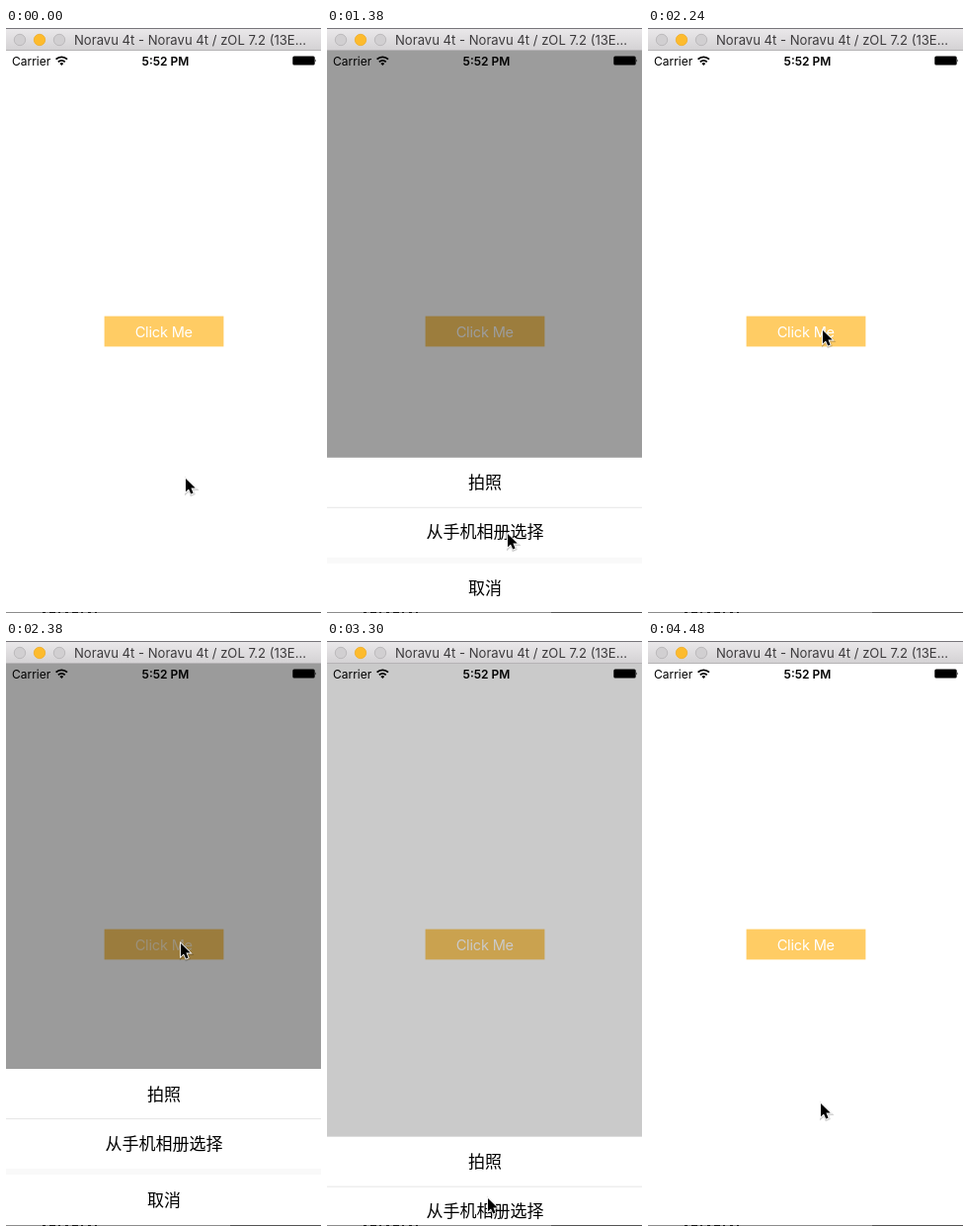
An HTML page that plays this animation: 319x592 px, repeating every 4500 ms.

```html
<!DOCTYPE html>
<html lang="en">
<head>
<meta charset="utf-8">
<title>Action sheet</title>
<style>
html, body { margin: 0; width: 100%; height: 100%; overflow: hidden; background: #fff; }
svg { display: block; width: 100vw; height: 100vh; }
text { font-family: Inter, "Open Sans", sans-serif; }
.mid { text-anchor: middle; }
.row { font-family: "Noto Sans CJK SC", "Noto Sans CJK", sans-serif; font-size: 17px; fill: #000; }
</style>
</head>
<body>
<svg viewBox="0 0 319 592">
  <defs>
    <linearGradient id="bar" x2="0" y2="1">
      <stop offset="0" stop-color="#ebe9eb"/>
      <stop offset="1" stop-color="#d3d1d3"/>
    </linearGradient>
    <clipPath id="screen"><rect y="23" width="319" height="568"/></clipPath>
  </defs>
  <rect width="319" height="592" fill="#fff"/>

  <rect x="99.6" y="291.6" width="120.8" height="30.8" fill="#ffcc64"/>
  <text id="label" class="mid" x="159.8" y="312.5" font-size="14.6" letter-spacing="-.2" fill="#fff">Click Me</text>
  <rect id="dim" y="23" width="319" height="568" opacity="0"/>

  <g clip-path="url(#screen)">
    <g id="sheet">
      <rect width="319" height="160" fill="#fff"/>
      <rect y="50" width="319" height="1" fill="#e6e6e6"/>
      <rect y="101" width="319" height="6" fill="#f9f9f9"/>
      <text class="row mid" x="160" y="31.5">拍照</text>
      <text class="row mid" x="160" y="81.5">从手机相册选择</text>
      <text class="row mid" x="160" y="138.5">取消</text>
    </g>
  </g>

  <text x="6" y="37.5" font-size="12">Carrier</text>
  <g fill="none" stroke="#000" stroke-width="1.8">
    <path d="M50.6 31.7a8 8 0 0 1 11.4 0M52.9 34.3a4.8 4.8 0 0 1 6.8 0"/>
  </g>
  <path d="M56.3 38l-1.9-2.1a2.8 2.8 0 0 1 3.8 0z"/>
  <text class="mid" x="161.5" y="37.5" font-size="12" font-weight="600">5:52 PM</text>
  <rect x="290.3" y="28.4" width="22.4" height="9.2" rx="1.5"/>
  <path d="M313.4 31.4q1.4 1.6 0 3.2z"/>

  <rect width="319" height="23" fill="url(#bar)"/>
  <rect width="319" height="1" fill="#77757a"/>
  <rect y="22" width="319" height="1" fill="#b5b3b5"/>
  <g stroke-width=".8">
    <circle cx="14" cy="12" r="5.7" fill="#d1cfd1" stroke="#b5b3b5"/>
    <circle cx="34" cy="12" r="5.7" fill="#fdbb2d" stroke="#efad27"/>
    <circle cx="54" cy="12" r="5.7" fill="#d1cfd1" stroke="#b5b3b5"/>
  </g>
  <text x="69" y="17" font-size="13.1" fill="#3c3a3c">Noravu 4t - Noravu 4t / zOL 7.2 (13E...</text>

  <rect y="591" width="319" height="1" fill="#8c8c8c"/>
  <rect x="227" y="591" width="92" height="1" fill="#555"/>
  <path d="M37 591.5H92" stroke="#111" stroke-dasharray="3 4 6 3 2 5"/>

  <g id="cursor">
    <path d="M0 0V14L3.2 11 5.5 16.3 8 15.2 5.7 10.1H10.2Z" transform="translate(.4 1)" fill="none" stroke="#000" stroke-opacity=".18" stroke-width="3"/>
    <path d="M0 0V14L3.2 11 5.5 16.3 8 15.2 5.7 10.1H10.2Z" stroke="#fff" stroke-width="1.8" paint-order="stroke"/>
  </g>
</svg>
<script>
const LOOP = 4500, SLIDE = 80, FADE = 150, HEIGHT = 158, BOTTOM = 591;

// time, x, y of the pointer tip
const path = [
  [0, 182, 456], [510, 187, 307], [680, 187, 307], [1270, 183, 512], [1410, 183, 512],
  [1570, 174, 346], [1640, 174, 346], [2170, 177, 306], [2460, 177, 306], [3190, 163, 564],
  [3320, 163, 564], [3700, 172, 311], [4340, 178, 300], [4480, 175, 468]
];
// press, open and close times of each visit
const visits = [
  { press: 565, open: 603.5, close: 1376 },
  { press: 2262, open: 2300, close: 3264.5 }
];

const el = id => document.getElementById(id);
const clamp = v => Math.min(1, Math.max(0, v));
const ease = v => { v = clamp(v); return v * v * (3 - 2 * v); };

function pointer(t) {
  let i = 1;
  while (i < path.length - 1 && path[i][0] < t) i++;
  const a = path[i - 1], b = path[i];
  const k = ease((t - a[0]) / (b[0] - a[0]));
  return [a[1] + (b[1] - a[1]) * k, a[2] + (b[2] - a[2]) * k];
}

function draw(t) {
  let shown = 0, label = 1;
  for (const v of visits) {
    shown += ease((t - v.open) / SLIDE) - ease((t - v.close) / SLIDE);
    if (t >= v.press) label = 0.2 + 0.8 * ease((t - v.open) / FADE);
  }
  const [x, y] = pointer(t);
  el("sheet").setAttribute("transform", `translate(0 ${BOTTOM - HEIGHT * shown})`);
  el("dim").setAttribute("opacity", 0.392 * shown ** 1.1);
  el("label").setAttribute("opacity", label);
  el("cursor").setAttribute("transform", `translate(${x} ${y}) scale(.95)`);
}

const start = performance.now();
function tick() {
  draw((performance.now() - start) % LOOP);
  requestAnimationFrame(tick);
}
tick();
</script>
</body>
</html>
```
